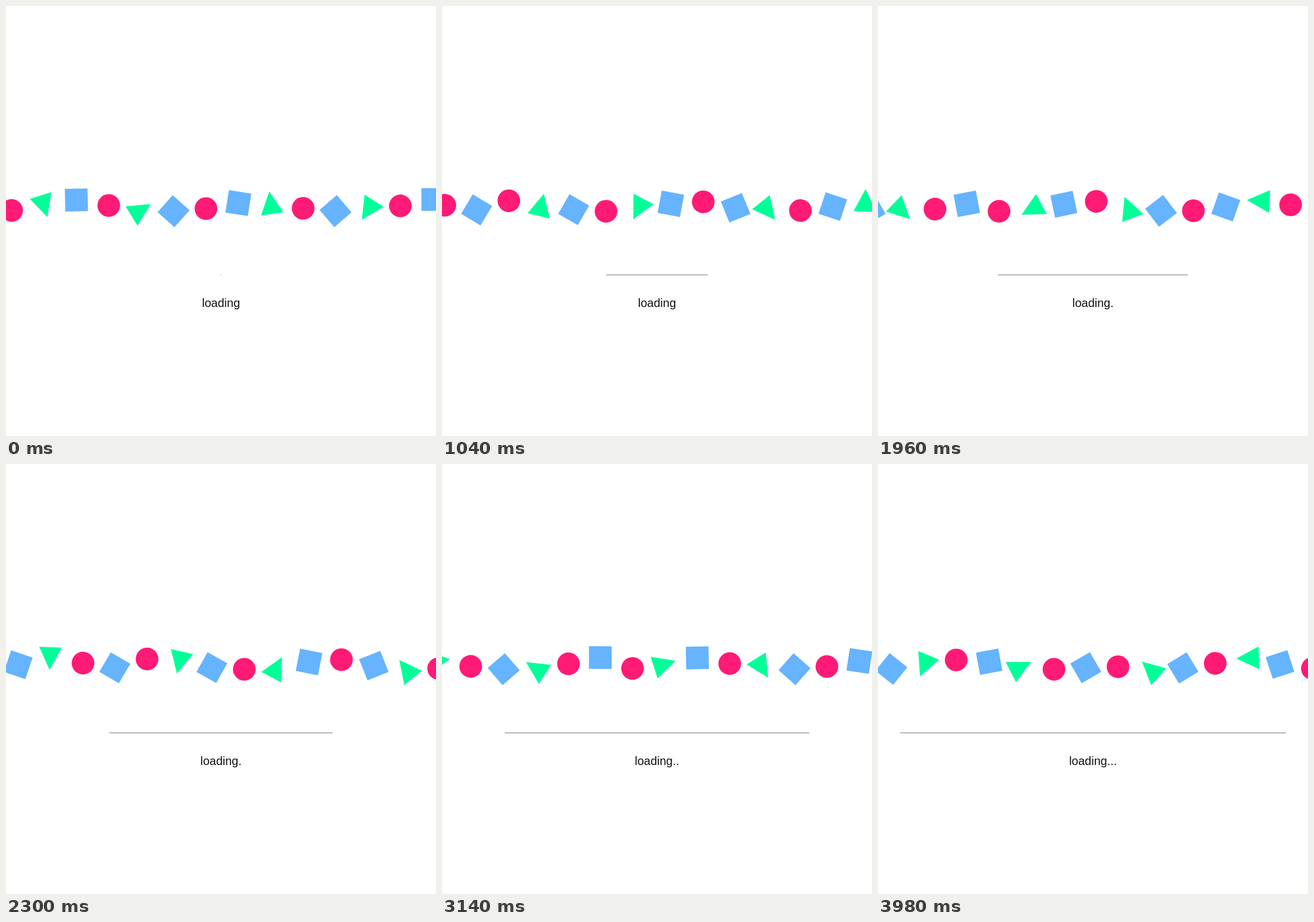
Recreate the animation shown at these times as an HTML page with a canvas. Size 730x730 px, loop 4 s.

```html
<!DOCTYPE html>
<html lang="en">
<head>
<meta charset="utf-8">
<title>loading</title>
<style>
  html, body { margin: 0; width: 100%; height: 100%; overflow: hidden; background: #fff; }
  canvas { display: block; }
</style>
</head>
<body>
<canvas id="stage" width="730" height="730"></canvas>
<script>
const W = 730;
const LOOP = 4000;
const TICK = 20;
const SIZE = 38.5;
const HALF = SIZE / 2;
const GAP = 55;
const FIRST_X = 9.5;
const SPEED = 2;      // px per tick
const SPIN = 0.05;    // radians per tick
const LAG = 1.2833;   // radians between neighbours

const ctx = document.getElementById('stage').getContext('2d');

// C circle, S square, T triangle; lower case spins the other way
const row = [...'CtsCTSCSTCSTCs'].map((kind, i, all) => ({
  kind: kind.toUpperCase(),
  dir: kind === kind.toUpperCase() ? 1 : -1,
  x: FIRST_X + GAP * i,
  lag: LAG * (all.length - 1 - i)
}));

const painters = {
  C() {
    ctx.fillStyle = '#ff1a75';
    ctx.beginPath();
    ctx.arc(0, 0, HALF, 0, Math.PI * 2);
    ctx.fill();
  },
  S() {
    ctx.fillStyle = '#66b3ff';
    ctx.fillRect(-HALF, -HALF, SIZE, SIZE);
  },
  T() {
    ctx.fillStyle = '#00ff99';
    ctx.beginPath();
    ctx.moveTo(0, -HALF);
    ctx.lineTo(HALF, HALF);
    ctx.lineTo(-HALF, HALF);
    ctx.fill();
  }
};

// Position after n ticks; a shape past the right edge re-enters at the left
function xAt(start, n) {
  const limit = W + HALF;
  const x = start + SPEED * n;
  if (x <= limit) return x;
  const exit = Math.floor((limit - start) / SPEED) + 1;
  return -HALF + SPEED * (n - exit);
}

function drawShape(shape, n) {
  const angle = SPIN * n - shape.lag;
  ctx.save();
  ctx.translate(xAt(shape.x, n), W * 0.45 + 20 * Math.abs(Math.sin(2 * angle)));
  ctx.rotate(shape.dir * angle);
  painters[shape.kind]();
  ctx.restore();
}

function drawProgress(t) {
  const w = W * 0.9 * t / LOOP + 1;
  ctx.fillStyle = '#777';
  ctx.fillRect((W - w) / 2, 456, w, 1);

  ctx.fillStyle = '#111';
  ctx.font = '20px "Liberation Sans", Arial, sans-serif';
  ctx.textAlign = 'center';
  ctx.fillText('loading' + '.'.repeat(Math.floor(t / 1200)), W / 2, W * 0.7);
}

function draw(ms) {
  const n = Math.floor((ms % LOOP) / TICK);
  ctx.fillStyle = '#fff';
  ctx.fillRect(0, 0, W, W);
  row.forEach(shape => drawShape(shape, n));
  drawProgress(n * TICK);
}

const begin = performance.now();
function loop() {
  draw(performance.now() - begin);
  requestAnimationFrame(loop);
}
loop();
</script>
</body>
</html>
```
